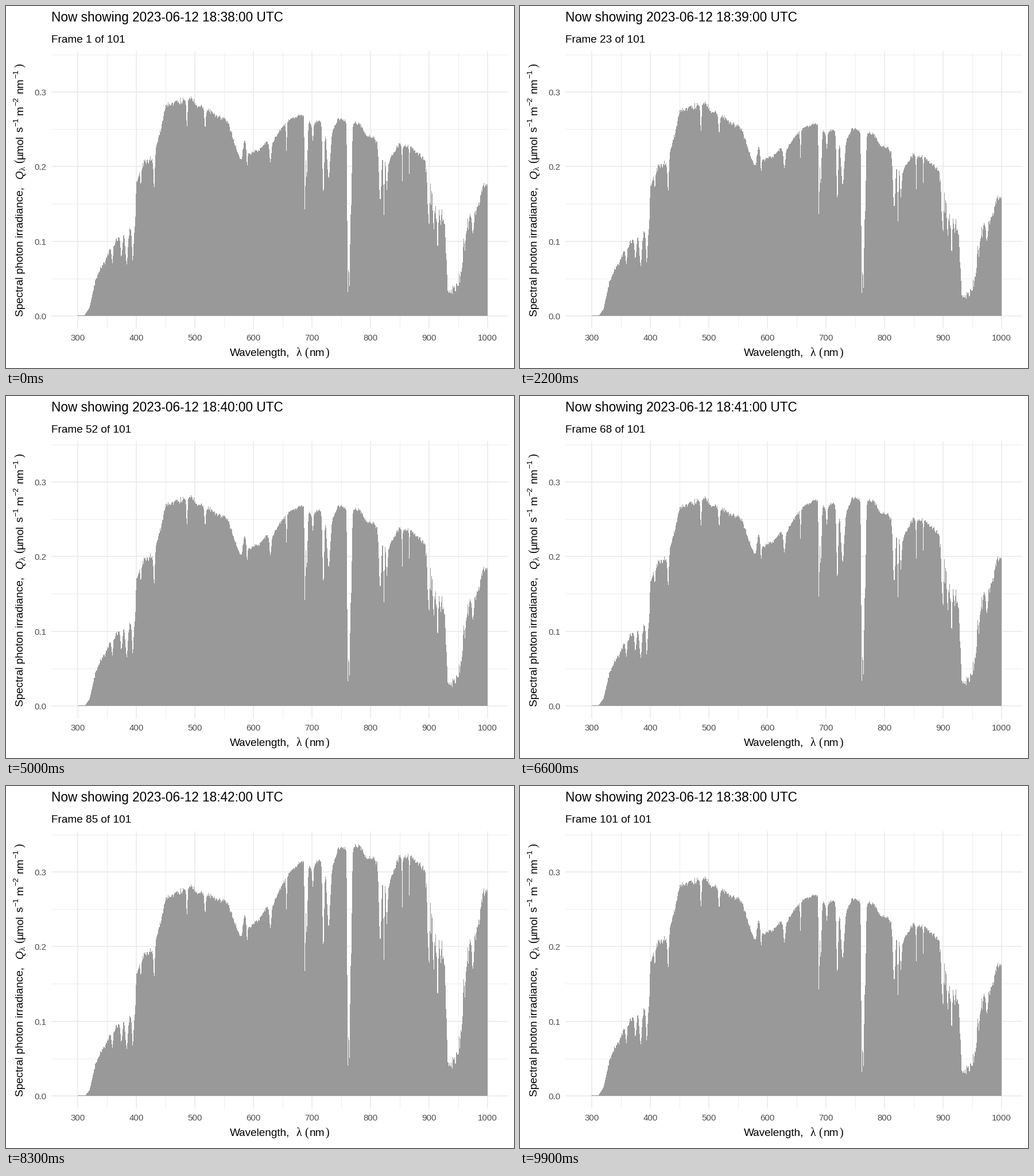
Write a matplotlib script that moves like this. It is 885 by 632 pixels and loops after 10 s.

```python
import numpy as np
import matplotlib.pyplot as plt
from matplotlib.animation import FuncAnimation

W, H, DPI = 885, 632, 100
PT = 72 / DPI
SANS, SERIF = "Liberation Sans", "Liberation Serif"

N_FRAMES, N_LABELS = 100, 101
HOLD, MOVE = 10, 10
STEP = HOLD + MOVE

# Sunlight without its narrow absorption lines: (nm, irradiance)
ENVELOPE = np.array([
    (311, 0), (320, .010), (331, .050), (367, .104), (398, .122), (400, .178),
    (412, .204), (430, .211), (451, .282), (496, .292), (503, .280),
    (511, .280), (556, .260), (577, .209), (580, .210), (585, .236),
    (592, .216), (612, .223), (622, .233), (630, .228), (645, .248),
    (661, .262), (683, .270), (697, .257), (713, .261), (735, .250),
    (745, .264), (783, .256), (793, .240), (806, .238), (833, .207),
    (848, .229), (870, .226), (891, .210), (904, .162), (927, .122),
    (932, .030), (950, .040), (967, .130), (980, .136), (992, .171),
    (1000, .177)])

# Absorption lines: (centre nm, depth, width nm)
DIPS = [
    (359, .25, 1.8), (374.5, .28, 2.2), (383.5, .38, 3), (394, .38, 2),
    (408, .10, 1.5), (430.5, .21, 1.4), (486.5, .13, 1.5), (517.5, .10, 1.6),
    (589.3, .11, 1.2), (629, .10, 2), (656.5, .14, 1), (688, .48, 1),
    (691, .30, 2), (701.5, .09, 1.6), (719.5, .37, 2), (728.5, .27, 4),
    (761.4, .87, 1.5), (764, .85, 1.9), (767, .40, 1.8), (816.5, .32, 2.8),
    (823, .38, 1.2), (828, .20, 2), (854.3, .22, .7), (866.3, .16, .7),
    (899.5, .32, 2.2), (908, .25, 1.8), (914.5, .38, 1.3), (975, .18, 1.8)]

# Each later minute relative to the first one
RATIO_NM = [400, 490, 560, 600, 750, 880, 1000]
RATIOS = [
    [.970, .977, .960, .963, .950, .935, .903],
    [.952, .960, .960, .970, 1.01, 1.033, 1.04],
    [.930, .953, .960, .986, 1.057, 1.10, 1.13],
    [.912, .960, .995, 1.05, 1.262, 1.434, 1.57]]
ONSET = [.0015, .0015, .0005, .0022]

# Roughness of the curve: (nm, relative amplitude)
ROUGH = np.array([
    (320, .04), (400, .015), (450, .008), (660, .004), (890, .008),
    (897, .06), (935, .04), (945, .14), (975, .03), (1000, .01)])


def px(nm):
    return 125 + (nm - 300) * 1.02


def py(value):
    return 540.8 - value * 1302.5


edges = np.arange(125, 840)
nm = 300 + (edges[:-1] + .5 - 125) / 1.02
rng = np.random.default_rng(12)


def bell(centre, width):
    return np.exp(-((nm - centre) / width) ** 2)


base = np.interp(nm, *ENVELOPE.T)
for centre, depth, width in DIPS:
    base *= 1 - depth * bell(centre, width)
base *= 1 + np.interp(nm, *ROUGH.T) * rng.normal(size=nm.size).clip(-2, 2)
base[0] = .0008

spectra = [base]
for ratio, cut in zip(RATIOS, ONSET):
    y = base * np.interp(nm, RATIO_NM, ratio) * (1 - .15 * bell(940, 12))
    spectra.append(np.maximum(y - cut * np.clip((340 - nm) / 20, 0, 1), 0))

fig = plt.figure(figsize=(W / DPI, H / DPI), dpi=DPI, facecolor="white")
ax = fig.add_axes([0, 0, 1, 1])
ax.set_xlim(0, W)
ax.set_ylim(H, 0)
ax.axis("off")


def write(x, y, s, size=19, color="black", font=SANS, **kw):
    return ax.text(x, y, s, fontsize=size * PT, color=color, family=font,
                   va="baseline", **kw)


def write_up(y, s, x=30, size=19, font=SANS, **kw):
    write(x, y, s, size, font=font, rotation=90, rotation_mode="anchor", **kw)


def power(y, s):
    write_up(y, s, 21, 13.3)


def grid(xs, ys, width):
    style = dict(color="#EBEBEB", lw=width * PT, zorder=0,
                 solid_capstyle="butt")
    for x in xs:
        ax.plot([px(x)] * 2, [79, 563], **style)
    for y in ys:
        ax.plot([79, 875], [py(y)] * 2, **style)


ticks_x = range(300, 1001, 100)
ticks_y = np.arange(4) / 10
grid(range(350, 1000, 100), ticks_y + .05, .9)
grid(ticks_x, ticks_y, 1.6)
for t in ticks_x:
    write(px(t), 584, str(t), 15, "#4D4D4D", ha="center")
for t in ticks_y:
    write(70, py(t) + 6, f"{t:.1f}", 15, "#4D4D4D", ha="right")

write(389.5, 611, "Wavelength,")
write(528.5, 611, "nm")
for x, s in (506, "λ"), (520, "("), (556.5, ")"):
    write(x, 611, s, 20, font=SERIF)

write_up(542.5, "Spectral photon irradiance,")
write_up(302, "Q", style="italic")
write_up(287, "λ", 34, 14, SERIF)
write_up(274, "(", size=20, font=SERIF)
write_up(267, "µmol")
write_up(220, "s")
power(210, "−1")
write_up(190.5, "m")
power(173.5, "−2")
write_up(152.5, "nm")
power(125.5, "−1")
write_up(107, ")", size=20, font=SERIF)

title = write(79, 27, "", 22.65)
subtitle = write(79, 64, "")
area = ax.stairs(py(base), edges, baseline=541, fill=True, color="#999999",
                 antialiased=False, zorder=2)


def update(i):
    k = round(i * (N_LABELS - 1) / (N_FRAMES - 1))
    state, pos = divmod(k, STEP)
    n = len(spectra)
    a, b = spectra[state % n], spectra[(state + 1) % n]
    t = max(0, pos - HOLD) / MOVE
    nearest = (state + (t >= .5)) % n
    area.set_data(values=py(a + (b - a) * t))
    title.set_text(f"Now showing 2023-06-12 18:{38 + nearest}:00 UTC")
    subtitle.set_text(f"Frame {k + 1} of {N_LABELS}")
    return area, title, subtitle


anim = FuncAnimation(fig, update, frames=N_FRAMES, interval=100, repeat=True,
                     repeat_delay=0, blit=False)
plt.show()
```
